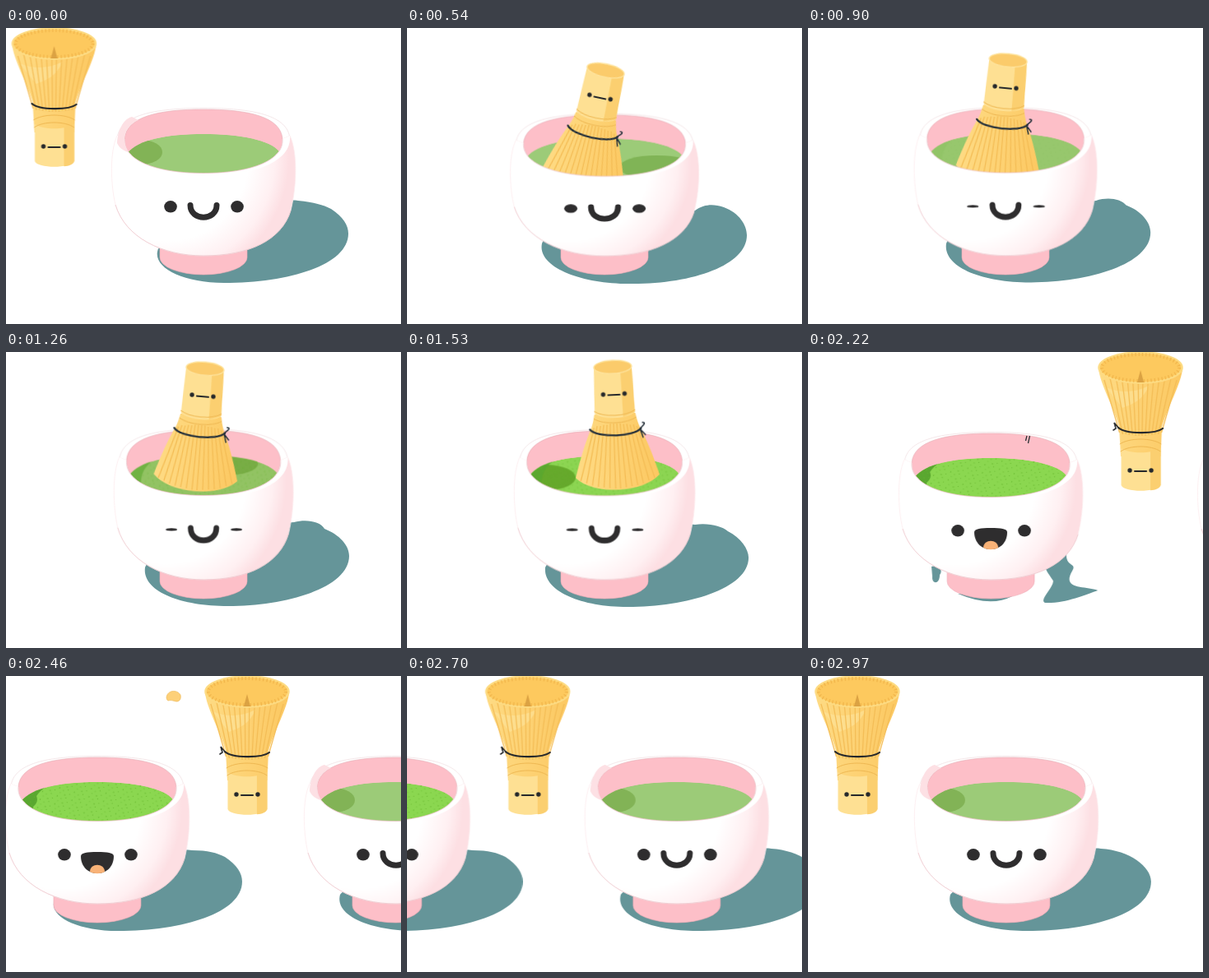
An HTML page without scripts for the animation above (3 s loop, 480x360 px).

```html
<!DOCTYPE html>
<html lang="en">
<head>
<meta charset="utf-8">
<title>Matcha time</title>
<style>
html, body { margin: 0; width: 100%; height: 100%; overflow: hidden; background: #fff; }
svg { display: block; width: 100vw; height: 100vh; }

.world, .shade, .squash, .whisk, .eye, .base, .blob { animation: 3s infinite; }
.world { animation-name: pan; }
.shade { animation-name: shade; }
.squash { animation-name: squash; transform-origin: 240px 285px; }
.whisk { animation-name: whisk; animation-timing-function: ease-in-out; }
.eye { animation-name: blink; transform-box: fill-box; transform-origin: center; }
.base { animation-name: base; }
.blob { animation-name: blob; animation-timing-function: ease-in-out; }

/* hard switches */
.up, .spin, .stir, .knot, .smile, .laugh, .patch, .drip, .crumb, .ticks { animation: 3s step-end infinite; }
.up { animation-name: up; }
.spin { animation-name: spin; }
.stir { animation-name: stir; }
.knot { animation-name: knot; }
.smile { animation-name: smile; }
.laugh { animation-name: laugh; }
.foam { animation: foam 3s linear infinite; }
.patch { animation-name: patch; }
.drip { animation-name: drip; }
.crumb { animation-name: crumb; }
.ticks { animation-name: ticks; }

@keyframes pan {
  0% { transform: none; }
  69.67% { transform: translateX(0); animation-timing-function: cubic-bezier(.37,0,.63,1); }
  100% { transform: translateX(-363px); }
}
@keyframes whisk {
  0% { transform: translate(58.5px,95px) rotate(0deg); animation-timing-function: ease-in; }
  4% { transform: translate(74px,84px) rotate(22deg); animation-timing-function: linear; }
  9% { transform: translate(130px,62px) rotate(92deg); animation-timing-function: linear; }
  14% { transform: translate(196px,80px) rotate(166deg); animation-timing-function: ease-out; }
  18% { transform: translate(225px,129px) rotate(192deg); }
  23% { transform: translate(256px,116px) rotate(176deg); }
  28% { transform: translate(224px,122px) rotate(191deg); }
  33% { transform: translate(258px,110px) rotate(175deg); }
  37.5% { transform: translate(262px,106px) rotate(175deg); }
  42% { transform: translate(235px,99px) rotate(185deg); }
  46% { transform: translate(222px,108px) rotate(190deg); }
  50% { transform: translate(256px,96px) rotate(176deg); }
  54% { transform: translate(238px,104px) rotate(186deg); animation-timing-function: ease-in; }
  57% { transform: translate(268px,84px) rotate(236deg); animation-timing-function: linear; }
  60% { transform: translate(315px,70px) rotate(301deg); animation-timing-function: linear; }
  64% { transform: translate(376px,72px) rotate(342deg); animation-timing-function: ease-out; }
  68% { transform: translate(419px,92px) rotate(362deg); }
  70%, 100% { transform: translate(422px,95px) rotate(360deg); }
}
@keyframes squash {
  0%, 13% { transform: none; }
  18% { transform: scale(1.025,.965); }
  23% { transform: scale(.99,1.01); }
  28% { transform: scale(1.015,.98); }
  33% { transform: scale(.985,1.015); }
  37% { transform: scale(1.01,.985); }
  42% { transform: scale(.975,1.02); }
  46% { transform: scale(1.01,.985); }
  50% { transform: scale(.98,1.02); }
  57%, 100% { transform: none; }
}
@keyframes blink {
  0%, 16.5% { transform: none; }
  18% { transform: scaleY(.76); }
  20%, 54% { transform: scale(.92,.23); }
  57%, 100% { transform: none; }
}
@keyframes base {
  0%, 25% { fill: #9ccb78; }
  42% { fill: #92c363; }
  56%, 100% { fill: #8bd750; }
}
@keyframes blob {
  0%, 10% { transform: translate(165px,151px); fill: #82b356; }
  18% { transform: translate(302px,165px) scale(1.8,1); fill: #80b456; }
  26% { transform: translate(170px,155px) scale(1.4,1); }
  34% { transform: translate(300px,155px) scale(1.4,1); }
  42% { transform: translate(268px,139px) scale(1.6,.9); fill: #78ad45; }
  50% { transform: translate(165px,155px) scale(1.4,1); }
  58%, 62% { transform: translate(301px,147px) scale(1.1,.95); fill: #5aa71c; }
  70%, 100% { transform: translate(142px,150px); fill: #5aa730; }
}
@keyframes foam { 0%, 28% { opacity: 0; } 42% { opacity: .6; } 56%, 100% { opacity: 1; } }
@keyframes shade {
  0%, 5% { d: path("M416 250C416 288 345 310 265 310C215 310 180 292 184 272C190 245 320 205 355 210C375 212 385 215 395 220C410 230 416 240 416 250"); }
  18% { d: path("M413 252C413 289 345 312 270 311C210 311 158 290 164 262C176 235 320 215 350 222C362 214 372 214 385 218C404 225 413 240 413 252"); }
  42% { d: path("M417 248C417 287 340 309 270 309C210 309 165 290 169 262C180 235 320 210 350 207C365 203 382 206 387 215C405 222 417 235 417 248"); }
  54% { d: path("M415 250C415 288 340 310 268 310C210 310 165 290 168 262C180 235 320 207 350 210C368 208 382 212 390 218C406 226 415 240 415 250"); }
  60% { d: path("M392 278C375 295 325 310 268 310C212 310 162 288 167 262C180 240 300 244 335 245C350 245 360 248 358 253C340 275 365 272 392 278"); }
  74% { d: path("M370 290C355 295 330 306 306 305C298 302 318 285 316 278C310 268 290 250 332 244C330 262 345 256 339 266C325 290 355 284 370 290"); }
  80%, 90% { d: path("M416 250C416 288 345 310 265 310C215 310 180 292 188 272C190 245 320 205 355 212C375 212 385 215 395 220C410 230 416 240 416 250"); transform: none; }
  98%, 100% { d: path("M416 250C416 288 345 310 265 310C215 310 180 292 188 272C190 245 320 205 355 212C375 212 385 215 395 220C410 230 416 240 416 250"); transform: translateX(-70px); }
}
@keyframes up { 0% { opacity: 1; } 4% { opacity: 0; } 67%, 100% { opacity: 1; } }
@keyframes spin { 0% { opacity: 0; } 4% { opacity: 1; } 14% { opacity: 0; } 57% { opacity: 1; } 67%, 100% { opacity: 0; } }
@keyframes stir { 0% { opacity: 0; } 14% { opacity: 1; } 57%, 100% { opacity: 0; } }
@keyframes knot { 0% { opacity: 0; } 67% { opacity: 1; } 92%, 100% { opacity: 0; } }
@keyframes smile { 0% { opacity: 1; } 56%, 100% { opacity: 0; } }
@keyframes laugh { 0% { opacity: 0; } 56%, 100% { opacity: 1; } }
@keyframes patch { 0% { opacity: 1; } 15%, 100% { opacity: 0; } }
@keyframes drip { 0% { opacity: 0; } 71% { opacity: 1; } 77%, 100% { opacity: 0; } }
@keyframes crumb { 0% { opacity: 0; } 58% { opacity: 1; } 63% { opacity: 0; } 80% { opacity: 1; } 84%, 100% { opacity: 0; } }
@keyframes ticks { 0% { opacity: 0; } 59% { opacity: 1; } 76%, 100% { opacity: 0; } }
</style>
</head>
<body>
<svg viewBox="0 0 480 360" preserveAspectRatio="none">
<defs>
  <radialGradient id="glaze" gradientUnits="userSpaceOnUse" cx="195" cy="160" r="160">
    <stop offset=".62" stop-color="#fff"/>
    <stop offset=".82" stop-color="#fff0f2"/>
    <stop offset=".93" stop-color="#fddfe3"/>
  </radialGradient>
  <linearGradient id="bamboo" x2="1" y2="0">
    <stop stop-color="#fedb84"/>
    <stop offset=".55" stop-color="#fdd172"/>
    <stop offset="1" stop-color="#fcc861"/>
  </linearGradient>
  <pattern id="bubbles" width="31" height="17" patternUnits="userSpaceOnUse" patternTransform="rotate(17) scale(.6)" fill="#66b52e">
    <circle cx="4" cy="3" r="1.100"/><circle cx="13" cy="6" r=".8"/><circle cx="22" cy="2" r="1"/>
    <circle cx="8" cy="12" r=".8"/><circle cx="18" cy="14" r="1.100"/><circle cx="27" cy="10" r=".9"/>
  </pattern>
  <path id="pool" d="M148 152C160 136 195 129 240 129C285 129 320 136 332 150C320 168 285 177 240 177C195 177 160 168 148 152Z"/>
  <clipPath id="inPool"><use href="#pool"/></clipPath>

  <path id="foot" fill="#fdbfc8" stroke="#eeadb8" stroke-width=".6" d="M187 262V279A53 21 0 0 0 293 279V262Z"/>
  <g id="inside">
    <path fill="#fff" stroke="#f0dde0" stroke-width=".7" d="M135 135C137 106 180 97.500 240 97.500C300 97.500 343 106 345 135C345 165 300 182 240 182C180 182 135 165 135 135Z"/>
    <path fill="#fdbfc8" stroke="#e6a9b3" stroke-width=".6" d="M144 135C146 108 185 99 240 99C295 99 334 108 336 135C338 160 300 177 240 177C180 177 142 160 144 135Z"/>
  </g>
  <g id="front">
    <path fill="url(#glaze)" stroke="#fdebee" stroke-width=".8" d="M144 135C142 160 180 177 240 177C300 177 338 160 336 135L345 131C354 150 354 190 346 222C335 258 295 277 240 277C190 277 145 255 133 215C127 190 126 150 135 131Z"/>
    <path fill="#fff" d="M144 135C142 160 180 177 240 177C300 177 338 160 336 135L345 131C348 163 300 180 240 180C180 180 132 163 135 131Z"/>
    <path fill="none" stroke="#ebc3c9" stroke-width=".7" d="M144 135C142 160 180 176.500 240 176.500C300 176.500 338 160 336 135M133 215C145 255 190 277 240 277C295 277 335 258 346 222"/>
  </g>
  <path id="blush" fill="#fde0e4" d="M135 140C136 122 144 110 153 108L161 112C149 117 144 126 144 137C145 144 147 147 149 151C142 149 137 145 135 140Z"/>
  <path id="u" fill="none" stroke="#2e2d2e" stroke-width="7" stroke-linecap="round" d="M224 215.500C224 235 256 235 256 215.500"/>

  <g id="face">
    <circle cx="-13" r="2.700"/><circle cx="13" r="2.700"/>
    <path d="M-7 1H7" fill="none" stroke="#25282b" stroke-width="2.200" stroke-linecap="round"/>
  </g>
  <path id="half" d="M2 -10L3 69M6 -10L10 68M10 -9L17 67M14 -9L24 66M18 -8L31 64M22 -8L38 61M26 -6L45 58"/>
  <g id="ribs" fill="none" stroke="#f4bd56" stroke-width="1.300"><use href="#half"/><use href="#half" transform="scale(-1 1)"/></g>
  <path id="rings" fill="none" stroke="#eeb752" stroke-width="1" d="M-25 -26C-14 -18 14 -18 25 -26M-26 -17C-14 -9 14 -9 26 -17"/>
  <g id="tie" fill="none" stroke="#25282b" stroke-width="1.600" stroke-linecap="round"><path d="M-27 -3L-32 -9L-30 -2L-33 0"/></g>
  <path id="cord" fill="none" stroke="#25282b" stroke-width="2.200" stroke-linecap="round" d="M-27 -3C-18 5 18 5 27 -2"/>

  <!-- brush up, origin at the cord -->
  <g id="upright">
    <path fill="url(#bamboo)" d="M-51 -75C-50 -58 -31 -24 -26 -4L-24 32H24.500L26 -4C31 -24 50 -58 51 -75Z"/>
    <path fill="#fee39a" opacity=".65" d="M-42 -52C-25 -44 -5 -46 10 -54C4 -38 -8 -32 -22 -27Z"/>
    <use href="#ribs" transform="translate(0 -3) scale(.98 -1)"/>
    <ellipse cy="-76" rx="50.500" ry="18.500" fill="#fdc95e" stroke="#fddb82" stroke-width="2.500"/>
    <ellipse cy="-76" rx="47" ry="16" fill="none" stroke="#f2b64b" stroke-width="4" stroke-dasharray="1.300 3"/>
    <path fill="#dba243" d="M-4 -58L0 -73L4 -58Z"/>
    <path fill="#fee093" d="M-23.500 22C-14 29 14 29 24.500 22V67C21 76 -21 76 -23.500 67Z"/>
    <path fill="#fbcf70" d="M12 26L24.500 22V67C23 71 18 73 12 73.300Z"/>
    <use href="#rings" transform="scale(.97 -1)"/>
    <use href="#cord"/>
    <use href="#face" y="49"/>
  </g>
  <!-- brush up, seen from the side -->
  <g id="sideways">
    <path fill="url(#bamboo)" d="M-54 -66C-46 -50 -34 -24 -29 -4L-24 30H24L29 -4C34 -24 46 -50 54 -66A54 20 0 0 0 -54 -66Z"/>
    <use href="#ribs" transform="scale(1.06 -1.15)"/>
    <path fill="#fee093" d="M-24.500 22C-14 28 14 28 24.500 22L21 75C14 81 -14 81 -21 75Z"/>
    <path fill="#fbcf70" d="M12 26L24.500 22L21 75Q17 78 11 79Z"/>
    <use href="#rings" transform="scale(.97 -1)"/>
    <use href="#cord" transform="scale(1.1 1)"/>
    <use href="#tie"/>
    <use href="#face" y="53"/>
  </g>
  <!-- handle up -->
  <g id="dipped">
    <path fill="url(#bamboo)" d="M-25 -22C-27 -10 -30 -4 -32 0C-40 18 -47 40 -51 54C-30 76 30 76 51 54C47 40 40 18 32 0C30 -4 27 -10 25 -22Z"/>
    <use href="#ribs"/>
    <path fill="#fee093" d="M-23 -78L-24.500 -23C-14 -15 14 -15 24.500 -23L23 -78Z"/>
    <path fill="#fbcf70" d="M9 -78L10 -18L24.500 -23L23 -78Z"/>
    <ellipse cy="-79" rx="23" ry="8" fill="#fbcb6b" stroke="#fee39c" stroke-width="1.500"/>
    <use href="#rings"/>
    <g fill="none" stroke="#25303a" stroke-linecap="round">
      <path stroke-width="2.400" d="M-31 -4C-22 7 22 7 31 -3"/>
      <path stroke-width="1.500" d="M30 -3C36 -8 37 -10 33 -10M30 -2L36 5M30 -2L33 8"/>
    </g>
    <use href="#face" y="-46"/>
  </g>
</defs>

<g class="world">
  <path class="shade" fill="#659599" d="M416 250C416 288 345 310 265 310C215 310 180 292 184 272C190 245 320 205 355 210C375 212 385 215 395 220C410 230 416 240 416 250"/>
  <path class="drip" fill="#659599" d="M168 261C175 258 183 264 178 271C178 283 168 283 169 273ZM200 294Q240 311 266 297Z"/>
  <use href="#foot"/>
  <g class="squash">
    <use href="#inside"/>
    <g clip-path="url(#inPool)">
      <use href="#pool" class="base" fill="#9ccb78"/>
      <ellipse class="blob" rx="25" ry="15"/>
      <g class="foam">
        <path fill="#5aa730" d="M146 152C155 142 165 136 180 133C166 142 161 150 162 170Z"/>
        <use href="#pool" fill="url(#bubbles)"/>
      </g>
    </g>
  </g>

  <g class="whisk" fill="#25282b">
    <g class="up"><use href="#upright"/><use href="#tie" class="knot"/></g>
    <use href="#sideways" class="spin"/>
    <g class="stir"><use href="#dipped" transform="rotate(180)"/></g>
  </g>

  <g class="squash">
    <use href="#front"/>
    <use href="#blush" class="patch"/>
    <g fill="#2e2d2e">
      <ellipse class="eye" cx="200" cy="217.300" rx="7.800" ry="7.200"/>
      <ellipse class="eye" cx="281" cy="217.300" rx="7.800" ry="7.200"/>
    </g>
    <use href="#u" class="smile"/>
    <g class="laugh">
      <path fill="#2e2d2e" d="M220 219C220 215 228 214 240 214C252 214 260 215 260 219C260 232 251 240 240 240C229 240 220 232 220 219Z"/>
      <path fill="#f8b277" d="M231 238C231 227 249 227 249 238C244 241 236 241 231 238Z"/>
    </g>
  </g>

  <!-- next bowl -->
  <g transform="translate(363 0)">
    <path fill="#659599" d="M416 250C416 288 345 310 265 310C210 310 165 292 172 266C190 245 320 205 355 210C390 212 416 232 416 250"/>
    <use href="#foot"/><use href="#inside"/>
    <g clip-path="url(#inPool)">
      <use href="#pool" fill="#9ccb78"/>
      <ellipse cx="165" cy="151" rx="25" ry="15" fill="#82b356"/>
    </g>
    <use href="#front"/><use href="#blush"/>
    <g fill="#2e2d2e"><ellipse cx="200" cy="217.300" rx="7.800" ry="7.200"/><ellipse cx="281" cy="217.300" rx="7.800" ry="7.200"/></g>
    <use href="#u"/>
  </g>
</g>

<path class="crumb" fill="#fdd078" stroke="#eebb5c" stroke-width=".7" d="M195 26C196 17 208 16 212 23C213 28 211 31 207 31C203 30 200 29 197 30Q195 29 195 26Z"/>
<path class="ticks" fill="none" stroke="#2b2f33" stroke-width="1.300" d="M266 102L264.500 108M269.500 102L267.500 111"/>
</svg>
</body>
</html>
```
